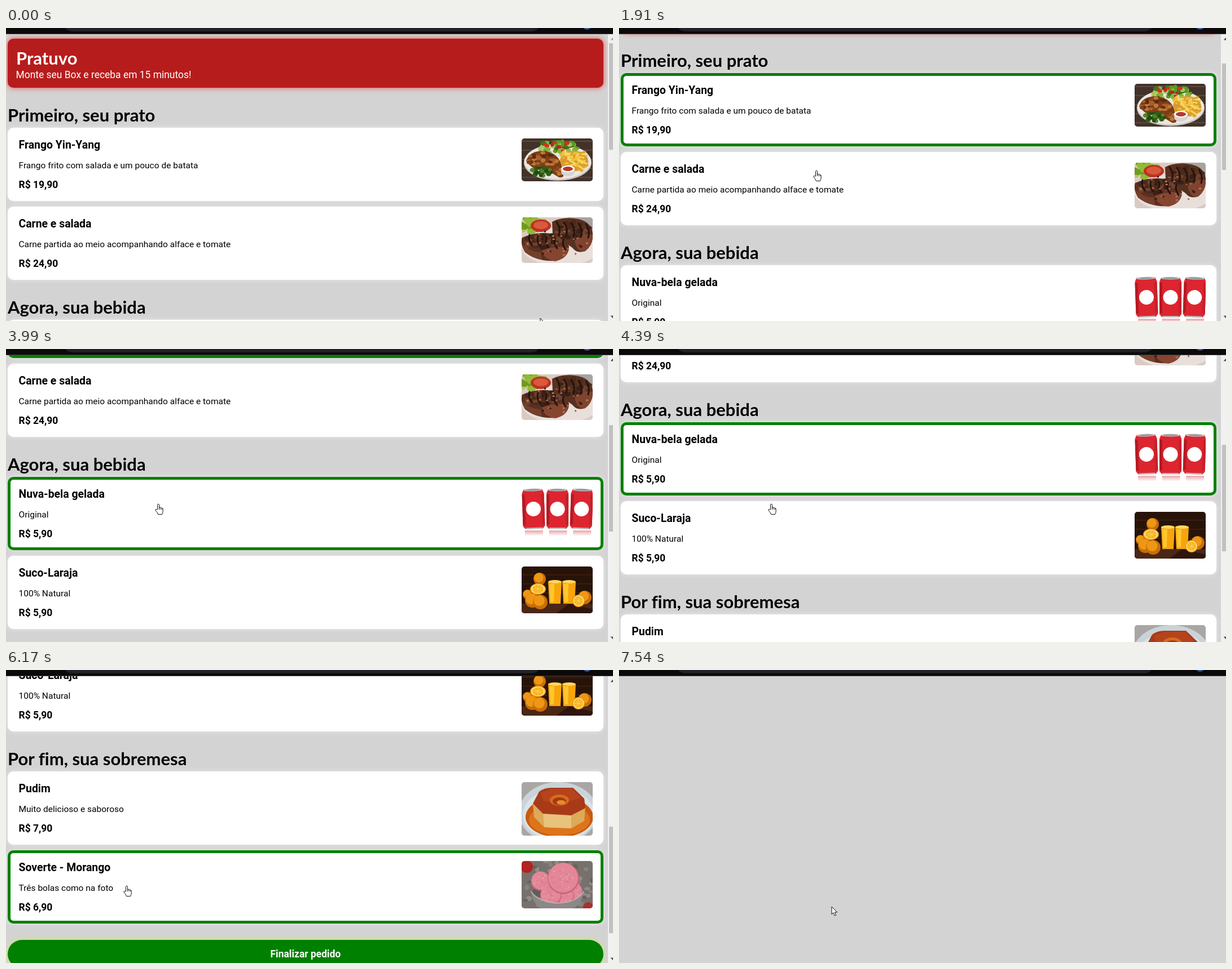
Write an HTML page that moves like this. It is 1076 px wide and 520 px high and loops after 8000 ms.

```html
<!DOCTYPE html>
<html lang="pt-BR">
<head>
<meta charset="utf-8">
<title>Pratuvo</title>
<style>
  html, body { margin: 0; width: 100%; height: 100%; overflow: hidden; background: #d3d3d3; }
  body { position: relative; font-family: Roboto, sans-serif; color: #000; }
  div, svg { position: absolute; box-sizing: border-box; }
  #page { left: 0; top: 0; width: 1076px; height: 1300px; }
  .wide { left: 3px; width: 1056px; border-radius: 10px; }
  .line { white-space: nowrap; line-height: 30px; margin-top: -15px; }
  .heading { font: 700 31px/40px Lato, sans-serif; font-variant-ligatures: none; margin-top: -20px; }
  .header { top: 19px; height: 87px; background: #b71c1c; color: #fff; box-shadow: 0 0 10px rgba(240, 30, 25, .75); }
  .card { height: 130px; background: #fff; box-shadow: 0 0 10px rgba(255, 255, 255, .5); }
  .card.chosen { box-shadow: inset 0 0 0 5px #008000, 0 0 10px rgba(255, 255, 255, .5); }
  .card .line { left: 19.5px; }
  .name { top: 31px; font-size: 19.4px; font-weight: 700; }
  .about { top: 66.5px; font-size: 15.52px; }
  .price { top: 101px; font-size: 17.46px; font-weight: 700; }
  .card svg { left: 910.5px; top: 19px; width: 126.5px; border-radius: 5px; }
  .button { top: 1158px; height: 50px; border-radius: 25px; background: #008000; color: #fff;
    box-shadow: 0 0 8px #c9ec62; font: 700 17.46px/51px Roboto, sans-serif; text-align: center; }
  #bar { left: 0; top: 0; width: 1076px; height: 11px; overflow: hidden; background: #0c090b; border-bottom: 1px solid #38403d; }
  #bar div { background: #222127; left: 102px; top: -24px; width: 845px; height: 30px; border-radius: 15px; }
  #bar .dot { background: #35599b; left: 1021px; top: -15px; width: 18px; height: 18px; }
  #scrollbar { left: 1067px; top: 11px; width: 9px; height: 509px; overflow: hidden; background: #f1f1f1; }
  #thumb { left: 2px; width: 13px; height: 189px; background: #c1c1c1; }
  #cursor { left: 0; top: 0; overflow: visible; }
  #cursor path { fill: #fff; stroke: #111; stroke-width: 1; stroke-linejoin: round; }
</style>
</head>
<body>
<div id="page">
  <div class="wide header">
    <div class="line heading" style="left:15px;top:34px">Pratuvo</div>
    <div class="line" style="left:14.5px;top:63.5px;font-size:17.46px">Monte seu Box e receba em 15 minutos!</div>
  </div>
  <div class="wide button">Finalizar pedido</div>
</div>
<div id="scrollbar">
  <div id="thumb"></div>
  <svg width="17" height="509"><path id="up" d="M4.5 10.5 8.5 6l4 4.5z"/><path d="M4.5 499.5l4 4.5 4-4.5z" fill="#505050"/></svg>
</div>
<div id="bar"><div></div><div class="dot"></div></div>
<svg id="cursor" width="20" height="22">
  <path id="arrow" d="M0 0V13.5L3 10.7 5.3 16 7.6 15 5.4 9.9H9.6Z"/>
  <g id="hand">
    <path d="M-1.5 10V1.7a1.5 1.5 0 0 1 3 0V7q.2-1.2 1.4-1t1.2 1.3q.2-1 1.3-.8t1.2 1.3q1.4-.5 1.6.9V13q0 2.5-1.6 5.5H-.5Q-2 14.5-5 11.2q-.6-1.8 1.4-1.7Z"/>
    <path d="M1.5 7v3M4.1 7.5V10M6.6 8v2"/>
  </g>
</svg>
<script>
const $ = id => document.getElementById(id);
const oval = (x, y, rx, ry, fill) => `<ellipse cx="${x}" cy="${y}" rx="${rx}" ry="${ry}" fill="${fill}"/>`;
const ball = (x, y, r, fill) => oval(x, y, r, r, fill);
const shape = (d, fill) => `<path d="${d}" fill="${fill}"/>`;
const stroke = (d, color, width) => `<path d="${d}" fill="none" stroke="${color}" stroke-width="${width}" stroke-linecap="round"/>`;
const rect = (x, y, w, h, fill) => shape(`M${x} ${y}h${w}v${h}h${-w}z`, fill);
const repeat = (n, draw) => Array.from({ length: n }, (_, i) => draw(i)).join('');

let seed = 7;
const random = (min, max) => {
  seed = (seed * 16807) % 2147483647;
  return +(min + (max - min) * seed / 2147483647).toFixed(1);
};
const scatter = (n, x, y, rx, ry, size, colors) => repeat(n, i => {
  const a = random(0, 6.28), d = Math.sqrt(random(0, 1));
  return oval((x + rx * d * Math.cos(a)).toFixed(1), (y + ry * d * Math.sin(a)).toFixed(1),
    random(size * .6, size), random(size * .4, size * .8), colors[i % colors.length]);
});

const chicken = () =>
  rect(0, 0, 127, 76, '#423229') +
  repeat(5, i => rect(0, 4 + i * 16, 127, 2, '#5b493d')) +
  oval(64, 43, 60, 32, '#c9c6c2') + oval(64, 41, 59, 31, '#eae7e3') +
  scatter(46, 62, 17, 38, 12, 6, ['#5c9a25', '#7fb43a', '#3c7419', '#a8c55a']) +
  scatter(9, 66, 15, 32, 8, 5, ['#d0321f', '#b9281a']) +
  oval(93, 40, 25, 18, '#d99a2b') +
  repeat(65, i => {
    const x = random(68, 108), y = random(25, 54);
    return stroke(`M${x} ${y}l${random(4, 12)} ${random(-7, 7)}`, ['#f2c341', '#dda02c', '#f8d865'][i % 3], 3);
  }) +
  shape('M8 40Q14 22 38 22 62 24 69 43L75 62Q75 71 66 69L48 58Q22 60 8 40Z', '#7d3d16') +
  scatter(48, 38, 39, 26, 14, 5, ['#a9602a', '#5e2b10', '#bd7838', '#843f18']) +
  scatter(14, 66, 59, 6, 8, 4, ['#c07a36', '#8f4a1d']) +
  scatter(28, 36, 58, 18, 8, 5, ['#315d16', '#52822a', '#234a10']) +
  oval(82, 59, 12, 8, '#d8d4d2') + oval(82, 54, 12, 6, '#fff') + oval(82, 54, 9, 4, '#b9382c');

const steak = () =>
  rect(0, 0, 127, 81, '#d9cbc4') + rect(82, 0, 45, 22, '#a7a3a2') +
  oval(70, 52, 70, 34, '#e9dfda') +
  scatter(34, 20, 14, 26, 14, 8, ['#94b936', '#b8d25c', '#6f9a22']) +
  oval(34, 15, 18, 11, '#bd3222') + oval(34, 14, 13, 7, '#d9593d') +
  shape('M54 8Q72-2 100 3 124 8 126 28 128 48 112 60 98 65 90 54L55 30Z', '#58301f') +
  scatter(30, 92, 23, 30, 16, 6, ['#4a281b', '#6f412c', '#3a2017']) +
  shape('M94 41Q112 27 126 31 127 49 113 60 98 64 94 41Z', '#80432f') +
  shape('M1 36Q22 26 46 28 78 32 84 52 84 73 58 77 28 79 6 62-3 46 1 36Z', '#5c3020') +
  scatter(34, 40, 44, 34, 13, 6, ['#4a281b', '#70422e', '#3a2017']) +
  shape('M36 59Q58 49 82 54 84 72 60 78 40 76 36 59Z', '#854531') +
  shape('M2 48Q16 62 34 62L36 75Q16 72 5 60Z', '#75402b') +
  repeat(5, i => stroke(`M${14 + i * 15} ${31 + i * 2}q-3 10 4 18`, '#24130d', 3)) +
  repeat(5, i => stroke(`M${62 + i * 13} ${8 + i}q8 12 4 24`, '#24130d', 3)) +
  scatter(30, 62, 46, 54, 24, 2.5, ['#a4654a', '#301b13', '#b87958']);

const can = i => {
  const x = i * 42.6 + .5, tilt = (i - 1) * 2;
  const body = `M${x + 4} 3h33l3 7v58l-4 5H${x + 5}l-4-5v-58z`;
  return `<g transform="rotate(${tilt} ${x + 20} 38)">` + shape(body, '#dd2530') +
    rect(x + 1, 12, 5, 54, '#b01b25') + rect(x + 35, 12, 5, 54, '#c3222c') +
    oval(x + 20.5, 4, 17, 2.5, '#c3c5c7') + oval(x + 20.5, 4, 13, 1.3, '#8e9193') +
    rect(x + 6, 71, 29, 2.5, '#b9bbbd') + ball(x + 20.5, 38, 13, '#fff') + '</g>';
};
const cans = () => rect(0, 0, 127, 88, '#fff') + repeat(3, can) +
  '<linearGradient id="fade" x2="0" y2="1"><stop stop-color="#e9a5a8"/><stop offset="1" stop-color="#fff"/></linearGradient>' +
  repeat(3, i => rect(i * 42.6 + 6, 76, 32, 10, 'url(#fade)'));

const slice = (x, y, rx, ry) => oval(x, y, rx, ry, '#f59b0c') + oval(x, y, rx * .85, ry * .85, '#fff0ad') +
  oval(x, y, rx * .74, ry * .74, '#f7b420') +
  repeat(4, i => {
    const a = i * Math.PI / 4, dx = rx * .7 * Math.cos(a), dy = ry * .7 * Math.sin(a);
    return stroke(`M${x - dx} ${y - dy}L${x + dx} ${y + dy}`, '#fbd66b', .8);
  });
const orange = (x, y, r) => ball(x, y, r, '#c96d08') + ball(x - r * .15, y - r * .2, r * .75, '#ee9714');
const glass = x => shape(`M${x} 27h24l-2 39h-20z`, '#f6a50c') + shape(`M${x + 2} 31h9l-1 32h-6z`, '#ffc62e') +
  oval(x + 12, 27, 12, 3, '#ffd75e');
const juice = () =>
  rect(0, 0, 127, 84, '#281309') + repeat(3, i => rect(0, 14 + i * 16, 127, 1.5, '#41210f')) +
  rect(0, 66, 127, 18, '#4a2716') + shape('M60 84 84 66 127 76V84Z', '#2e160c') +
  orange(32, 22, 11) + orange(112, 55, 12) + orange(11, 50, 9) + orange(19, 60, 13) + orange(33, 63, 13) +
  slice(29, 40, 14, 10) + glass(47) + glass(72) + slice(101, 61, 11, 11);

const pudding = () =>
  rect(0, 0, 127, 96, '#a9a6a3') + oval(65, 54, 70, 54, '#c9d3d8') + oval(66, 58, 64, 46, '#dae3e6') +
  oval(67, 62, 60, 36, '#c95a11') + oval(67, 67, 54, 28, '#dd741b') +
  shape('M20 38 22 62 40 80 88 82 111 69 113 44Z', '#dda95a') +
  shape('M38 54 40 80 88 82 88 57Z', '#e9c27c') +
  shape('M31 17Q40 10 52 10H91L111 29 113 46 88 59 38 56 20 38Z', '#a83a18') +
  shape('M33 19 53 12H90L105 28 80 35 40 34Z', '#b5441c') +
  oval(67, 32, 17, 10, '#d96a1e') + oval(67, 34, 12, 7, '#a23b10') + oval(70, 36, 8, 4, '#e98a2e');

const scoop = (x, y, r) => ball(x, y, r, '#cb687c') + ball(x - .5, y - 1.5, r * .94, '#e38798') +
  scatter(r * 1.2 | 0, x, y, r * .75, r * .75, 2.5, ['#e994a3', '#dc7e8f']);
const iceCream = () =>
  rect(0, 0, 127, 84, '#77716d') + scatter(70, 63, 42, 70, 46, 6, ['#88817c', '#69635f', '#938c86']) +
  ball(9, 10, 11, '#b3231f') + ball(118, 82, 9, '#a9302c') +
  shape('M17 55H110Q106 78 90 84H37Q20 76 17 55Z', '#8e8b8b') + oval(63, 56, 46, 12, '#625d5d') +
  scoop(34, 36, 17) + scoop(92, 54, 16) + scoop(76, 62, 17) + scoop(52, 61, 19) + scoop(74, 31, 28) +
  shape('M17 54Q28 72 63 75 98 74 110 54 107 76 92 84H35Q20 76 17 54Z', '#8d8787') +
  stroke('M17 54Q28 72 63 75 98 74 110 54', '#bdb8b7', 1.5);

const sections = [
  ['Primeiro, seu prato',
    ['Frango Yin-Yang', 'Frango frito com salada e um pouco de batata', '19,90', chicken, 76],
    ['Carne e salada', 'Carne partida ao meio acompanhando alface e tomate', '24,90', steak, 81]],
  ['Agora, sua bebida',
    ['Nuva-bela gelada', 'Original', '5,90', cans, 88],
    ['Suco-Laraja', '100% Natural', '5,90', juice, 83]],
  ['Por fim, sua sobremesa',
    ['Pudim', 'Muito delicioso e saboroso', '7,90', pudding, 95],
    ['Soverte - Morango', 'Três bolas como na foto', '6,90', iceCream, 84]],
];
const hotspots = [[1158, 50]];
sections.forEach(([title, ...dishes], s) => {
  let html = `<div class="line heading" style="left:3px;top:${154 + 341 * s}px">${title}</div>`;
  dishes.forEach(([name, about, price, art, height], i) => {
    const top = 177 + 341 * s + 140 * i;
    hotspots.push([top, 130]);
    html += `<div class="wide card" style="top:${top}px">
      <div class="line name">${name}</div><div class="line about">${about}</div><div class="line price">R$ ${price}</div>
      <svg viewBox="0 0 126.5 ${height}" style="height:${height}px">${art()}</svg></div>`;
  });
  $('page').insertAdjacentHTML('beforeend', html);
});
const cards = document.querySelectorAll('.card');

const LOOP = 8000, SUBMITTED = 7540;
const wheelTimes = [1910, 2240, 2800, 4390, 4670, 5050, 5510, 6570];
const choices = [[1320, 0], [3920, 2], [6100, 5]];
const track = [
  [0, 947, 515], [850, 361, 257], [1050, 345, 244], [1180, 350, 253], [3120, 350, 253], [3390, 270, 275],
  [5510, 270, 275], [5910, 214, 383], [6570, 214, 383], [7050, 373, 411], [7190, 373, 411], [7330, 377, 420], [LOOP, 377, 420],
];

function pointerAt(t) {
  const i = track.findIndex(key => key[0] > t);
  const [t0, x0, y0] = track[i - 1], [t1, x1, y1] = track[i];
  const u = (t - t0) / (t1 - t0), k = u * u * (3 - 2 * u);
  return [Math.round(x0 + (x1 - x0) * k), Math.round(y0 + (y1 - y0) * k)];
}

function render(now) {
  const t = now % LOOP, open = t < SUBMITTED;
  const scroll = 97 * wheelTimes.filter(w => w <= t).length;
  const [x, y] = pointerAt(t);
  const over = open && hotspots.some(([top, height]) => y + scroll >= top - 2 && y + scroll < top + height);

  $('page').style.display = $('scrollbar').style.display = open ? '' : 'none';
  $('page').style.transform = `translateY(${-scroll}px)`;
  $('thumb').style.top = 16 + scroll * .3697 + 'px';
  $('up').setAttribute('fill', scroll ? '#505050' : '#a3a3a3');
  choices.forEach(([time, card]) => cards[card].classList.toggle('chosen', t >= time));
  $('cursor').style.transform = `translate(${x}px, ${y}px)`;
  $('hand').style.display = over ? '' : 'none';
  $('arrow').style.display = over ? 'none' : '';
  requestAnimationFrame(() => render(performance.now() - start));
}
const start = performance.now();
render(0);
</script>
</body>
</html>
```
